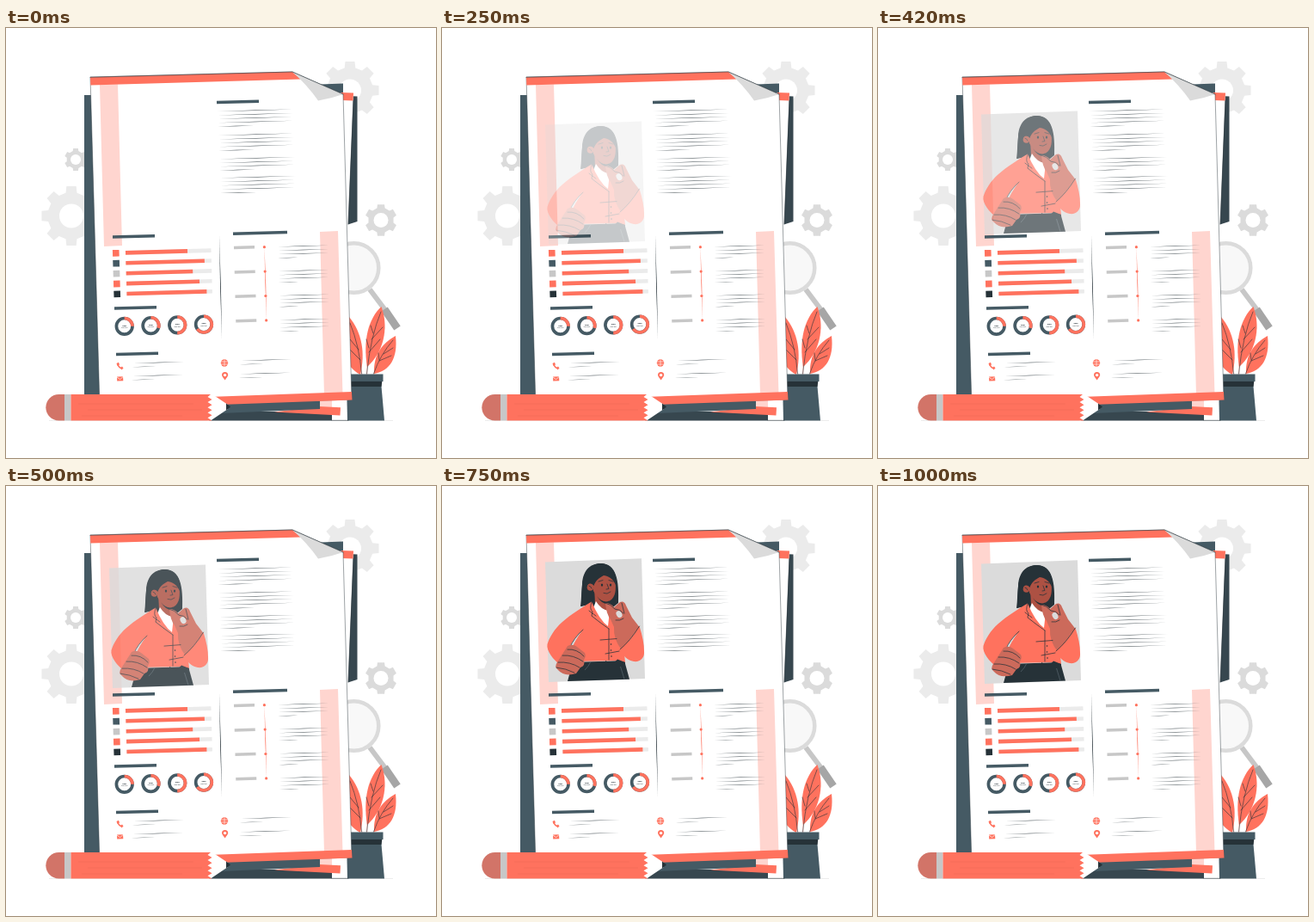
Write an HTML page that moves like this. It is 500 px wide and 500 px high and loops after 1040 ms.

```html
<!DOCTYPE html>
<html lang="en">
<head>
<meta charset="utf-8">
<title>Résumé</title>
<style>
html, body { margin: 0; width: 100%; height: 100%; overflow: hidden; background: #fff; }
svg { display: block; width: 100vw; height: 100vh; }
text { font-family: Lato, sans-serif; text-anchor: middle; fill: #263238; }
.o { fill: #ff725e; } .s { fill: #455a64; } .k { fill: #263238; } .d { fill: #37474f; }
.w { fill: #fff; } .p { fill: #ffd5cf; } .g { fill: #dbdbdb; }
.face { fill: #ad5143; } .hand { fill: #cc6a5b; }
.ink { fill: none; stroke: #263238; stroke-width: .6; stroke-linecap: round; }
#photo .ink { stroke-width: .75; }
</style>
</head>
<body>
<svg viewBox="0 0 500 500">
  <g id="gears"></g>

  <!-- magnifier -->
  <circle cx="404.500" cy="279" r="28.800" fill="#f8f8f8" stroke="#dbdbdb" stroke-width="4.500"/>
  <path d="M423 304L441 328" stroke="#c7c7c7" stroke-width="6"/>
  <path d="M440 327L455 349" stroke="#a6a6a6" stroke-width="9"/>

  <path d="M50 456.500H450" stroke="#e0e0e0" stroke-width=".6"/>

  <!-- plant -->
  <path d="M419.500 404L420 388M414 404L411 386M427.500 404L431 390" fill="none" stroke="#ffd5cf" stroke-width="1.400"/>
  <path class="o" d="M436.500 324C421 338 415 364 420 394C438 378 446 350 436.500 324Z"/>
  <path class="o" d="M399 336C414 354 418 378 412 403C402 398 394 388 392 372Z"/>
  <path class="o" d="M453 358C437 367 427 380 428 402C446 399 456 384 453 358Z"/>
  <path class="ink" d="M436 330Q424 358 419.500 402M422 377L435 362M425 362L438 348M422 372L419 362M427 355L424 346M400 343Q411 370 413.500 402M410 374L400 362M412 386L400 374M450 363Q435 380 427.500 402M434 387L448 381M439 379L450 372M434 386L433 378"/>
  <path class="s" d="M396 411H436L440 456.500H397Z"/>
  <path class="k" d="M396 410H437.500L436.500 417H396Z"/>
  <path class="s" d="M394 402.500H438.500V411H394Z"/>

  <!-- folder and rear sheet -->
  <path class="s" d="M91 78H120V430H91Z M366 65.500L392 64.500V79H366Z"/>
  <path class="d" d="M396 79L408.500 79.500V225L396 229Z"/>
  <path class="w" d="M380 75H404L389 450H364V433H380Z"/>
  <path class="ink" d="M404 84L398 228M379 456.300H398"/>
  <path class="o" d="M390 75L404 75.500L403.500 84.500L390 84Z"/>
  <path class="p" d="M364 430H379V442H364Z"/>
  <path class="d" d="M236 446H379V456.500H236Z"/>
  <path class="o" d="M364 440L389 441.300L388.500 450.500L312 446.500Z"/>
  <path class="s" d="M250 433L365 429V443L250 448Z"/>

  <!-- front sheet -->
  <path class="w" d="M98 57L333 51L392 77L402 432L109 441Z" stroke="#263238" stroke-width=".45"/>
  <path class="p" d="M109 66L130 65.500L135 253L114 254ZM365 237L386 236L391.500 426L370 427Z"/>
  <path class="o" d="M98 57.300L333 51L343 59.500L98.300 66.500ZM235 429L402 423L402.500 432.500L235 438.500Z"/>
  <path class="g" d="M333 51Q351 67 363 84.500Q378 82 392 77Z"/>
  <path class="ink" d="M98 57.300L333 51L392 77"/>
  <g id="page"></g>

  <!-- contact icons -->
  <path d="M130 390Q130 394 134.500 396" fill="none" stroke="#ff725e" stroke-width="1.500"/>
  <path class="o" d="M128.500 390L131 388.800L132 391.500L129.500 393ZM133 395L135 393.500L136.500 395.500L134.500 397.500ZM129 405.500L136 405.200L136.300 410.200L129.200 410.500Z"/>
  <path d="M129 406L132.700 408.600L136 405.600" fill="none" stroke="#fff" stroke-width=".7"/>
  <circle class="o" cx="254" cy="389.500" r="4.200"/>
  <path d="M250 388H258M250 391H258M254 385.500V393.500" stroke="#fff" stroke-width=".6"/>
  <path class="o" d="M254.700 409.500C253 407 251 405.500 251 403.600A3.600 3.600 0 0 1 258.200 403.600C258.200 405.500 256 407 254.700 409.500Z"/>
  <circle class="w" cx="254.600" cy="403.600" r="1.700"/>

  <!-- pencil -->
  <path d="M68 426H61.500A15.200 15.200 0 0 0 61.500 456.400H68Z" fill="#d27468"/>
  <path d="M68 426H75.500V456.400H68Z" fill="#c7c7c7"/>
  <path class="w" d="M234 426H240L258 438V443L238 456.400H234Z"/>
  <path class="k" d="M256 436.500L261 440.500L256 444.500Z"/>
  <path id="barrel" class="o"/>
  <path d="M84 437H218M95 444H228M88 451H205" stroke="#e5624f" stroke-width=".4"/>

  <!-- portrait -->
  <g id="photo">
    <path class="g" d="M120 90.500L232 86.300L236 226L124 230Z"/>
    <path class="k" d="M161 142C164 127 158 95 183 92C203 91 206 112 205 138L190 150L172 140Z"/>
    <path class="face" d="M177 120L178 138Q185 148 194 147L193 132Z"/>
    <path class="k" d="M180 130Q186 138 194 136V139Q186 140 180 130Z"/>
    <path class="w" d="M179 136Q185 146 194 147L197 166L186 164L175 146Z"/>
    <path class="face" d="M175 109C180 103 197 103 201 111C203 121 202 132 195 135.500C187 137 180 131 176 124Z"/>
    <circle class="face" cx="172.500" cy="119.500" r="4.200"/>
    <path class="k" d="M163 116C164 98 174 92 185 92C198 93 204 104 203 119C200 112 196 107 188 106C182 109 178 113 176.500 118C173 113 168 115 168.500 122Q168 134 171 138L162 142Z"/>
    <path class="k" d="M146 228.900L152 207L212 205L218 226.600Z"/>
    <path d="M166 216Q171 211 173 206M206 207L212 226.500" fill="none" stroke="#607078" stroke-width=".6"/>
    <path class="o" d="M174 136.500C163 143 149 152 140 160C130 169 125 178 122.500 186C121 194 130 204 137 210L154 206L204 205L213 207L209 165L195 147L193 165Q183 158 174 136.500Z"/>
    <path class="k" d="M190 205L198 209.500L204 203.500L213 207V212H190Z"/>
    <path class="g" d="M163 170Q153 179 148 190L151 190.500Q155 181 163 170Z"/>
    <path class="hand" d="M190 138Q196 138 200 143L207 137Q212 135 214 141L221 155L229.500 166L209 193Q199 180 200 166L196 157Q191 151 190 138Z"/>
    <path class="o" d="M229.500 165Q235 182 235 194C236 202 230 207 223 206C215 205 210 198 207 192Q219 182 229.500 165Z"/>
    <ellipse class="g" cx="206" cy="151" rx="3.200" ry="4.200" transform="rotate(-30 206 151)"/>
    <path class="ink" d="M174 137Q171 145 175 148L174 153Q184 161 194 168M190 138Q196 139 201 145Q207 145 211 150M209 138L212 150M202 158Q207 159 211 156M229.500 165Q219 182 207 192M164 169Q153 179 148.500 190M184 181L203 179.500M194 168V204M206 194L190 197M171 147L179 153"/>
    <g class="k">
      <ellipse cx="186" cy="117" rx="1.200" ry="1.600"/><ellipse cx="196" cy="117" rx="1.200" ry="1.600"/>
      <circle cx="196.500" cy="186" r=".8"/><circle cx="196.500" cy="193" r=".8"/><circle cx="197" cy="200" r=".8"/>
    </g>
    <path class="ink" d="M182 113L187 111.500M194 111.500L199 113M192 116L194 121.500L191 122M188 126.500Q192 128.500 196 125M171 118Q173 118 174 121"/>
    <path class="hand" d="M146 188Q152 185 157 189L166 196Q168 200 165 204Q167 211 161 213L156 220Q142 224 135 216Q130 212 134 207Z"/>
    <path class="ink" d="M146 192Q157 191 165 200M140 199Q153 198 164 206M135 207Q149 206 160 213M133 213Q144 214 154 219"/>
  </g>
</svg>
<script>
const $ = id => document.getElementById(id);
const ORANGE = '#ff725e', SLATE = '#455a64', GREY = '#c7c7c7', INK = '#263238';

function gear(x, y, r, hole, teeth, fill) {
  const at = (a, q) => `${x + q * Math.sin(a)} ${y - q * Math.cos(a)}`;
  const half = 1.300 / teeth, root = 1.900 / teeth, points = [];
  for (let i = 0; i < teeth; i++) {
    const a = i * 2 * Math.PI / teeth;
    points.push(at(a - root, r * .79), at(a - half, r), at(a + half, r), at(a + root, r * .79));
  }
  return `<path d="M${points.join('L')}Z" fill="${fill}"/><circle cx="${x}" cy="${y}" r="${hole}" fill="#fff"/>`;
}
$('gears').innerHTML = gear(76, 218.500, 35, 14, 8, '#ebebeb') + gear(400, 72.500, 34, 13, 8, '#ebebeb') +
  gear(81, 153, 13.300, 6, 6, '#dbdbdb') + gear(436, 223.500, 18.800, 8.500, 6, '#dbdbdb');

const line = (x1, y1, x2, y2, color, w) =>
  `<path d="M${x1} ${y1}L${x2} ${y2}" stroke="${color}" stroke-width="${w}"/>`;

// Hairline that thins out towards both ends
function sliver(x1, y1, x2, y2, color, w) {
  const mx = (x1 + x2) / 2, my = (y1 + y2) / 2, len = Math.hypot(x2 - x1, y2 - y1);
  const dx = (y1 - y2) / len * w, dy = (x2 - x1) / len * w;
  return `<path d="M${x1} ${y1}Q${mx + dx} ${my + dy} ${x2} ${y2}Q${mx - dx} ${my - dy} ${x1} ${y1}" fill="${color}"/>`;
}
const rule = (x, y, len) => sliver(x, y, x + len, y - len * .028, INK, .45);

// Full-width rules closed by one short rule
function paragraph(x, y, len, rows, step, last) {
  let out = '';
  for (let i = 0; i < rows; i++) out += rule(x + i * .1, y + i * step, i < rows - 1 ? len : last);
  return out;
}

let page = sliver(248, 242, 251, 361, INK, .8);
[[245, 86.500, 49], [124, 243, 49], [264, 239.300, 63], [126, 326, 49], [128, 379.500, 49]]
  .forEach(([x, y, len]) => page += line(x, y, x + len, y - len * .028, SLATE, 3.500));

[[246, 97, 5], [247, 125, 5], [248, 152.500, 4], [249, 174.500, 5]]
  .forEach(([x, y, rows]) => page += paragraph(x, y, 87.500, rows, 4.400, 42));

[[ORANGE, 72], [SLATE, 91.500], [GREY, 77.500], [ORANGE, 85], [INK, 93]].forEach(([color, len], i) => {
  const x = 139 + i * .35, y = 261.400 + i * 11.900;
  page += `<rect x="${x - 15}" y="${y - 3.700}" width="7.600" height="7.600" fill="${color}" transform="rotate(-1.600 ${x} ${y})"/>`;
  page += line(x, y, x + 99.500, y - 2.800, '#ebebeb', 4.600) + line(x, y, x + len, y - len * .028, ORANGE, 4.600);
});

[.25, .3, .5, .65].forEach((part, i) => {
  const x = 137.700 + i * 30.750, y = 346.800 - i * .75, r = 9.300, a = part * 2 * Math.PI;
  page += `<circle cx="${x}" cy="${y}" r="${r}" fill="none" stroke="${SLATE}" stroke-width="3.700"/>
    <path d="M${x} ${y - r}A${r} ${r} 0 ${+(part > .5)} 1 ${x + r * Math.sin(a)} ${y - r * Math.cos(a)}" fill="none" stroke="${ORANGE}" stroke-width="3.700"/>
    <text x="${x}" y="${y - .2}" font-size="2.500" font-weight="900">Skill</text>
    <text x="${x}" y="${y + 2.200}" font-size="1.800">level text</text>`;
});

page += sliver(300.500, 254.500, 303, 340, ORANGE, .8);
for (let i = 0; i < 4; i++) {
  const x = i * .75, y = 255 + i * 28.400;
  page += line(265 + x, y + .5, 289 + x, y - .2, GREY, 3.500) +
    `<circle class="o" cx="${300.400 + x}" cy="${y - .3}" r="1.600"/>` +
    paragraph(316 + x * .7, y - .5, 59, 4, 4.300, 23);
}

[[148, 390], [147, 405], [273, 387], [272, 402.500]]
  .forEach(([x, y]) => page += rule(x, y, 59) + rule(x - 1, y + 4.200, 27));
$('page').innerHTML = page;

let edge = 'M75.500 426H238';
for (let i = 1; i <= 10; i++) edge += `L${i % 2 ? 234.500 : 239.500} ${426 + i * 3.040}`;
$('barrel').setAttribute('d', edge + 'H75.500Z');

const bezier = (s, a, b) => 3 * a * s * (1 - s) ** 2 + 3 * b * s * s * (1 - s) + s ** 3;

// Slow start with a small overshoot before settling
function ease(x) {
  let lo = 0, hi = 1;
  for (let i = 0; i < 24; i++) {
    const mid = (lo + hi) / 2;
    if (bezier(mid, .4, .4) < x) lo = mid; else hi = mid;
  }
  return bezier(hi, .08, 1.380);
}

const LOOP = 1040, RISE = 1000, start = performance.now();
function draw(now) {
  const t = Math.max(0, now - start) % LOOP;
  const p = t < RISE ? ease(t / RISE) : 1;
  $('photo').setAttribute('transform', `translate(0 ${30 * (1 - p)})`);
  $('photo').setAttribute('opacity', Math.min(1, p));
  requestAnimationFrame(draw);
}
draw(start);
</script>
</body>
</html>
```
